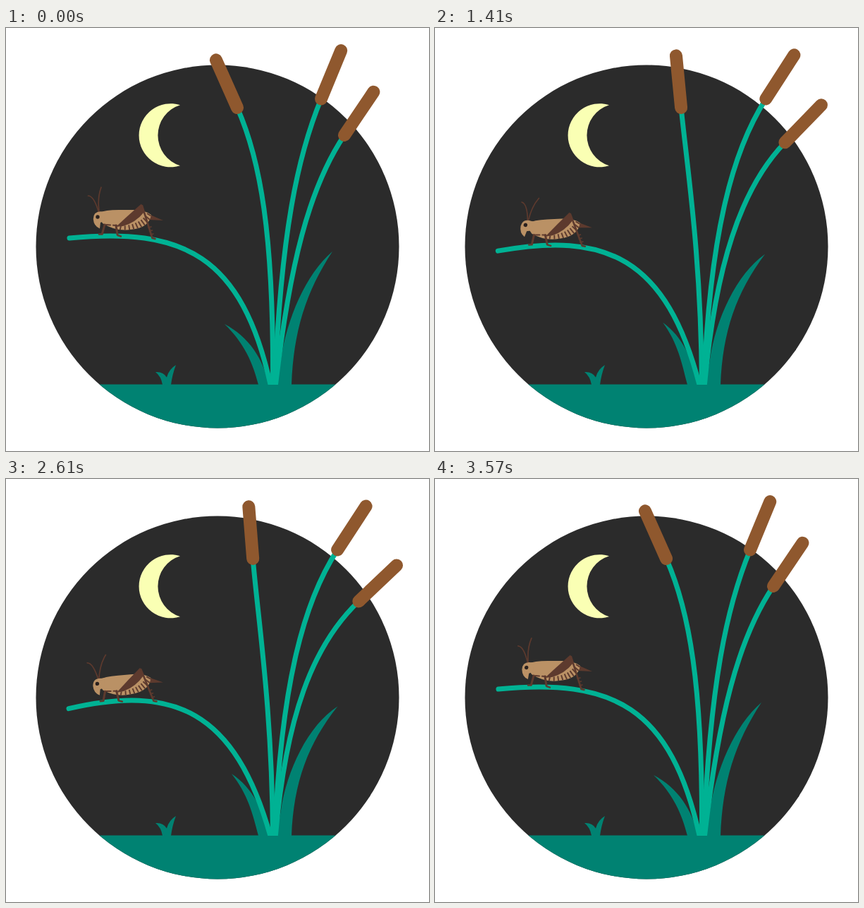
Write an HTML page that moves like this. It is 600 px wide and 600 px high and loops after 3600 ms.

```html
<!DOCTYPE html>
<html lang="en">
<head>
<meta charset="utf-8">
<title>Cricket at night</title>
<style>
html, body { margin: 0; width: 100%; height: 100%; overflow: hidden; background: #fff; }
svg { display: block; width: 100%; height: 100%; }
.stem { fill: none; stroke: #00b294; stroke-width: 7; stroke-linecap: round; }
.cob { stroke: #8f582e; stroke-width: 18; stroke-linecap: round; }
.green { fill: #008272; }
.tan { fill: #ba9165; }
.dark { fill: #5d3a2e; }
.limb { fill: none; stroke: #5d3a2e; stroke-linecap: round; stroke-linejoin: round; }
</style>
</head>
<body>
<svg viewBox="0 0 600 600">
  <defs>
    <clipPath id="disc"><circle cx="300" cy="310" r="257.5"/></clipPath>
    <clipPath id="above"><rect width="600" height="506"/></clipPath>
    <clipPath id="belly"><use href="#body"/></clipPath>
  </defs>
  <circle cx="300" cy="310" r="257.5" fill="#2b2b2b"/>
  <path fill="#faffb4" d="M247 109.3A45 45 0 1 0 247 195.2A45 45 0 0 1 247 109.3Z"/>
  <rect class="green" y="505.5" width="600" height="95" clip-path="url(#disc)"/>
  <path class="green" d="M222 506Q220 494 212 488Q223 487 228 495.5Q231 484 241 478Q236 491 234 506Z"/>
  <path class="green" id="leafL"/>
  <path class="green" id="leafR"/>
  <g clip-path="url(#above)">
    <path class="stem" id="stem0"/>
    <path class="stem" id="stem1"/>
    <path class="stem" id="stem2"/>
    <path class="stem" id="stem3"/>
  </g>
  <line class="cob" id="cob1"/>
  <line class="cob" id="cob2"/>
  <line class="cob" id="cob3"/>
  <g id="cricket">
    <path class="dark" d="M198 262L223 273L203 272Z"/>
    <path class="tan" id="body" d="M133 262Q140 258 160 258L180 258Q197 258 206 265Q203 284 176 286Q156 289 137 277L134 272Z"/>
    <g id="bands" clip-path="url(#belly)" stroke="#5d3a2e" stroke-width="1.9"></g>
    <path class="limb" stroke-width="2" stroke-dasharray="6 4" d="M142 279L157 280"/>
    <path class="limb" stroke-width="3" d="M140 279L136.5 291.5"/>
    <path class="limb" stroke-width="2.4" d="M136.5 292.5L132 292.5"/>
    <path class="limb" stroke-width="3" d="M156 280L158 293"/>
    <path class="limb" stroke-width="2.4" d="M158.5 294L163 295.5"/>
    <path class="dark" d="M156 282Q174 265 192 249.5L196 261Q184 276 166 281Z"/>
    <path class="limb" stroke-width="2.6" d="M193 252L207.5 298L211.5 299"/>
    <path class="limb" stroke-width="1.6" d="M202 283L206 282M203.5 288L207.5 287M205 293L209 292"/>
    <g id="head">
      <path class="limb" id="antL" stroke-width="1.7" d="M132 263Q125 238 116.5 238"/>
      <path class="limb" id="antR" stroke-width="1.7" d="M132.5 263Q129 242 135 226"/>
      <path class="tan" d="M137 260.5Q124 259 123.8 271Q124.5 281 133 284.5L134 276L139 274L141 260Z"/>
      <ellipse id="eye" cx="130" cy="268" rx="2.7" fill="#2b211e"/>
    </g>
  </g>
</svg>
<script>
const LOOP = 3600;

const el = id => document.getElementById(id);
const set = (id, attrs) => {
  for (const k in attrs) el(id).setAttribute(k, attrs[k]);
};
const mix = (a, b, p) => a + (b - a) * p;

// Sine ease from 0 to 1 between two times
const ease = (t, from, to) => {
  const u = Math.min(1, Math.max(0, (t - from) / (to - from)));
  return (1 - Math.cos(Math.PI * u)) / 2;
};
const hump = (t, mid, width) => ease(t, mid - width, mid) - ease(t, mid, mid + width);

// Lean in the wind: a first gust, a slower push to the peak, then back upright
const lean = (t, gust, peak, turn) =>
  gust * ease(t, 0, 900) + (1 - gust) * ease(t, 900, peak) - ease(t, turn, LOOP);

// A cattail: the cob stands on (x, y) and the stem leaves along its axis
function reed(n, x, y, degrees, reach, cx, cy, base) {
  const a = degrees * Math.PI / 180, sin = Math.sin(a), cos = Math.cos(a);
  set('stem' + n, { d: `M${x} ${y}C${x - reach * sin} ${y + reach * cos} ${cx} ${cy} ${base} 510` });
  set('cob' + n, { x1: x, y1: y, x2: x + 74 * sin, y2: y - 74 * cos });
}

function drawReeds(t) {
  const p = lean(t, .75, 1900, 2400);
  reed(1, mix(328, 352, p), 113, mix(-24, -3, p), 79, mix(380, 377.5, p), mix(290, 326, p), 378.5);
  const q = lean(t, .78, 1900, 2400);
  reed(2, mix(447, 472, q), 100.5, mix(22.4, 34, q), 85, 390, 287, 381);
  const r = lean(t, .62, 2200, 2400), drop = lean(t, .25, 2300, 2500);
  reed(3, mix(480, 502, r), mix(152, 174, drop), mix(34, 47.5, r), 90, mix(402, 396, r), 337, 382);
}

function drawLeaves(t) {
  const l = 16 * lean(t, .55, 1800, 1900);
  set('leafL', { d: `M358 506C350 475 ${338 + l / 2} 447 ${310 + l} ${420 - l * .18}C${345 + l / 2} 438 365 470 373 506Z` });
  const r = 8 * lean(t, .4, 2100, 2400);
  set('leafR', { d: `M383 506L390 470C398 414 ${425 + r / 2} 349 ${463 + r} ${317 + r * .75}C${425 + r / 2} 375 408 430 405 506Z` });
}

function drawCricket(t) {
  // The blade dips twice, the second time in mirror
  const m = Math.min(t, LOOP - t);
  const b = ease(m, 0, 900) - .58 * ease(m, 900, 1800);
  set('stem0', { d: `M${90 - b} ${298 + 28 * b}C${250 - 15 * b} ${283 + 9 * b} ${335 - 10 * b} ${320 + 5 * b} 376 510` });
  set('cricket', { transform: `translate(${2 * b} ${20 * b}) rotate(${-4.6 * b} 170 297)` });
  set('head', { transform: `rotate(${18 * ease(t, 0, 800) - 15 * ease(t, 1900, 2500)} 141 262)` });
  set('antL', { transform: `rotate(${-22 * hump(t, 870, 500) - 10 * hump(t, 1890, 400)} 132 263)` });
  set('antR', { transform: `rotate(${13 * b * b} 132.5 263)` });
  set('eye', { ry: 2.7 - 2 * hump(t, 1890, 100) });
}

function addBands(count) {
  const quad = (a, c, d, s) => (1 - s) * (1 - s) * a + 2 * s * (1 - s) * c + s * s * d;
  for (let i = 0; i < count; i++) {
    const s = i / (count - 1);
    const line = document.createElementNS('http://www.w3.org/2000/svg', 'line');
    line.setAttribute('x1', quad(163, 190, 200, s));
    line.setAttribute('y1', quad(281, 279, 263, s));
    line.setAttribute('x2', quad(161, 197, 208, s));
    line.setAttribute('y2', quad(289, 292, 268, s));
    el('bands').append(line);
  }
}

addBands(10);
const start = performance.now();
function tick() {
  const t = (performance.now() - start) % LOOP;
  drawReeds(t);
  drawLeaves(t);
  drawCricket(t);
  requestAnimationFrame(tick);
}
tick();
</script>
</body>
</html>
```
